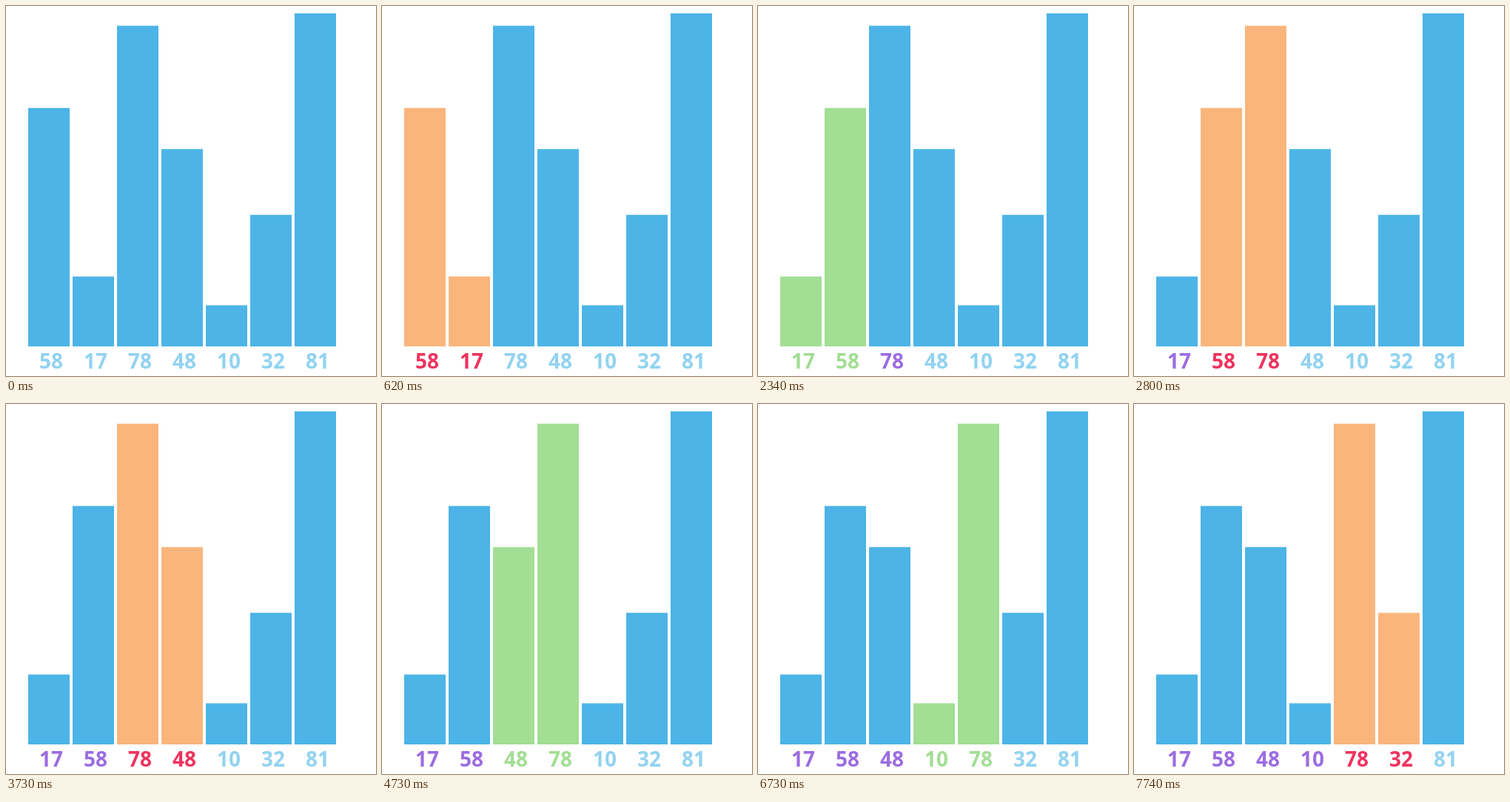
Recreate the animation shown at these times as an HTML page with a canvas. Size 500x500 px, loop 8 s.

```html
<!DOCTYPE html>
<html lang="en">
<head>
<meta charset="utf-8">
<title>Bubble sort</title>
<style>
html, body { margin: 0; width: 100%; height: 100%; overflow: hidden; background: #fff; }
canvas { display: block; }
</style>
</head>
<body>
<canvas id="stage" width="500" height="500"></canvas>
<script>
const ctx = document.getElementById('stage').getContext('2d');
const LOOP = 8000;
const VALUES = [58, 17, 78, 48, 10, 32, 81];
const UNIT = 450 / 81;
const BASE = 460;

const BLUE = [76, 180, 231], ORANGE = [250, 181, 124], GREEN = [162, 222, 148];
const PALE = [146, 211, 240], RED = [238, 52, 94], PURPLE = [155, 109, 224];

// start, end, number of visible steps, action, left slot of the pair
const EVENTS = [
  [300, 620, 5, 'compare', 0],
  [1310, 1790, 7, 'swap', 0],
  [2340, 2800, 7, 'compare', 1],
  [3340, 3730, 6, 'compare', 2],
  [4340, 4730, 6, 'swap', 2],
  [5360, 5810, 7, 'compare', 3],
  [6350, 6730, 6, 'swap', 3],
  [7280, 7740, 7, 'compare', 4]
];

const copy = bars => bars.map(bar => ({ ...bar }));

function apply(bars, action, left) {
  const next = copy(bars);
  for (const bar of next) {
    const inPair = bar.slot === left || bar.slot === left + 1;
    if (!inPair) {
      bar.fill = BLUE;
      if (bar.ink !== PALE) bar.ink = PURPLE;
    } else if (action === 'compare') {
      bar.fill = ORANGE;
      bar.ink = RED;
    } else {
      bar.slot = 2 * left + 1 - bar.slot;
      bar.fill = GREEN;
      bar.ink = GREEN;
    }
  }
  return next;
}

let state = VALUES.map((value, slot) => ({ value, slot, fill: BLUE, ink: PALE }));
const initial = state;
const stages = EVENTS.map(([start, end, steps, action, left]) => {
  const from = copy(state);
  const to = state = apply(state, action, left);
  // a newly reached number turns purple before fading to red
  if (action === 'compare' && left > 0) {
    from.find(bar => bar.slot === left + 1).ink = PURPLE;
  }
  return { start, end, steps, from, to };
});

const ease = p => p < 0.5 ? 4 * p ** 3 : 1 - 4 * (1 - p) ** 3;
const mix = (a, b, p) => a + (b - a) * p;
const color = (a, b, p) => `rgb(${a.map((v, i) => Math.round(mix(v, b[i], p)))})`;

function progress({ start, end, steps }, time) {
  if (time >= end) return 1;
  const last = steps - 1;
  const step = Math.floor((time - start) / (end - start) * last);
  return ease((step + 0.4) / (last + 0.4));
}

function drawBar(from, to, p) {
  const x = 30 + 60 * mix(from.slot, to.slot, p);
  const height = from.value * UNIT;
  ctx.fillStyle = color(from.fill, to.fill, p);
  ctx.fillRect(x, BASE - height, 56, height);
  ctx.fillStyle = color(from.ink, to.ink, p);
  ctx.fillText(from.value, x + 15, 490);
}

function draw(time) {
  ctx.fillStyle = '#fff';
  ctx.fillRect(0, 0, 500, 500);
  ctx.font = 'bold 28px "Open Sans", "Noto Sans", sans-serif';
  const stage = stages.filter(s => s.start <= time).pop();
  const from = stage ? stage.from : initial;
  const to = stage ? stage.to : initial;
  const p = stage ? progress(stage, time) : 0;
  from.forEach((bar, i) => drawBar(bar, to[i], p));
}

const origin = performance.now();
function tick() {
  draw((performance.now() - origin) % LOOP);
  requestAnimationFrame(tick);
}
tick();
</script>
</body>
</html>
```
